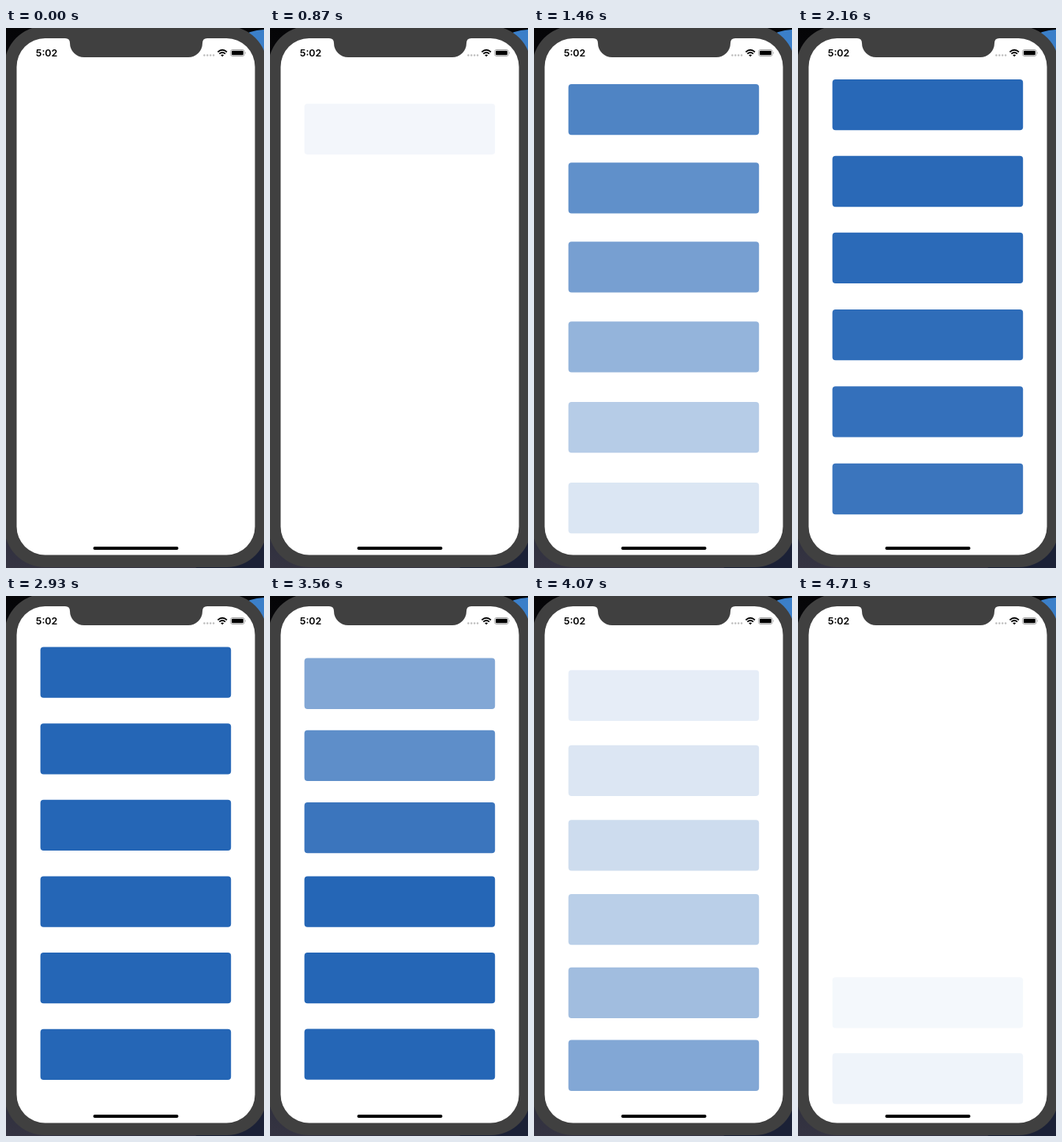
Write an HTML page that moves like this. It is 327 by 683 pixels and loops after 5040 ms.

```html
<!DOCTYPE html>
<html lang="en">
<head>
<meta charset="utf-8">
<title>Staggered bars</title>
<style>
  html, body { margin: 0; width: 100%; height: 100%; overflow: hidden; background: #111; }
  svg { display: block; width: 327px; height: 683px; }
  text { font: 600 12.4px Inter, "Liberation Sans", sans-serif; }
</style>
</head>
<body>
<svg viewBox="0 0 327 683">
  <defs>
    <linearGradient id="sky" x2="0" y2="1">
      <stop offset="0" stop-color="#050507"/>
      <stop offset=".9" stop-color="#2c2d3b"/>
      <stop offset="1" stop-color="#353442"/>
    </linearGradient>
  </defs>

  <!-- Desktop behind the phone -->
  <rect width="327" height="683" fill="url(#sky)"/>
  <path d="M296 12Q308 3 327 2V50H296z" fill="#3b7fc9"/>
  <path d="M240 683L327 630V683z" fill="#1b2136"/>

  <!-- Phone body and screen -->
  <rect x="-2" y="-2.5" width="333" height="684.5" rx="51" fill="#404040"/>
  <rect x="13.5" y="13" width="302" height="653.5" rx="36" fill="#fff"/>

  <g id="bars" fill="#2566b6"></g>

  <path d="M75 12v1q6 0 6 6a18 18 0 0 0 18 18H231a18 18 0 0 0 18-18q0-6 6-6v-1z" fill="#404040"/>

  <!-- Status bar -->
  <text x="37.8" y="36">5:02</text>
  <g fill="#bcbcbc">
    <circle cx="251.4" cy="34.5" r="1.2"/>
    <circle cx="255.3" cy="34.5" r="1.2"/>
    <circle cx="259.2" cy="34.5" r="1.2"/>
    <circle cx="263.1" cy="34.5" r="1.2"/>
  </g>
  <g fill="none" stroke="#000" stroke-width="1.8">
    <path d="M268.4 30.4Q274.2 25.2 280 30.4"/>
    <path d="M270.4 32.6Q274.2 29.3 278 32.6"/>
  </g>
  <path d="M272.2 34.2Q274.2 32.6 276.2 34.2L274.2 36.2z"/>
  <rect x="284.7" y="27.5" width="17.4" height="8" rx="2.2" fill="none" stroke="#999" stroke-width=".9"/>
  <rect x="286" y="28.8" width="14.8" height="5.4" rx="1"/>
  <path d="M303 30.2q1.2 1.3 0 2.6z" fill="#777"/>

  <rect x="110.5" y="656" width="108" height="4" rx="2"/>
</svg>
<script>
const LOOP = 5040, COUNT = 6, STAGGER = 102, RATE = 0.0045;
const ENTER = 789, LEAVE = 3238;
const TOP = 64.5, PITCH = 96.6, DROP = 33, FAINTEST = 0.045;

const group = document.getElementById("bars");
const bars = Array.from({ length: COUNT }, () => {
  const bar = document.createElementNS("http://www.w3.org/2000/svg", "rect");
  const shape = { x: 43.6, width: 241.6, height: 64.3, rx: 4 };
  for (const key in shape) bar.setAttribute(key, shape[key]);
  return group.appendChild(bar);
});

// Critically damped spring from 0 to 1
function spring(ms) {
  const x = Math.max(0, ms) * RATE;
  return 1 - (1 + x) * Math.exp(-x);
}

function draw(now) {
  const t = now % LOOP;
  bars.forEach((bar, i) => {
    const local = t - i * STAGGER;
    const shown = spring(local - ENTER) - spring(local - LEAVE);
    bar.setAttribute("y", TOP + i * PITCH + DROP * (1 - shown));
    bar.setAttribute("opacity", shown < FAINTEST ? 0 : shown);
  });
  requestAnimationFrame(() => draw(performance.now()));
}
draw(performance.now());
</script>
</body>
</html>
```
